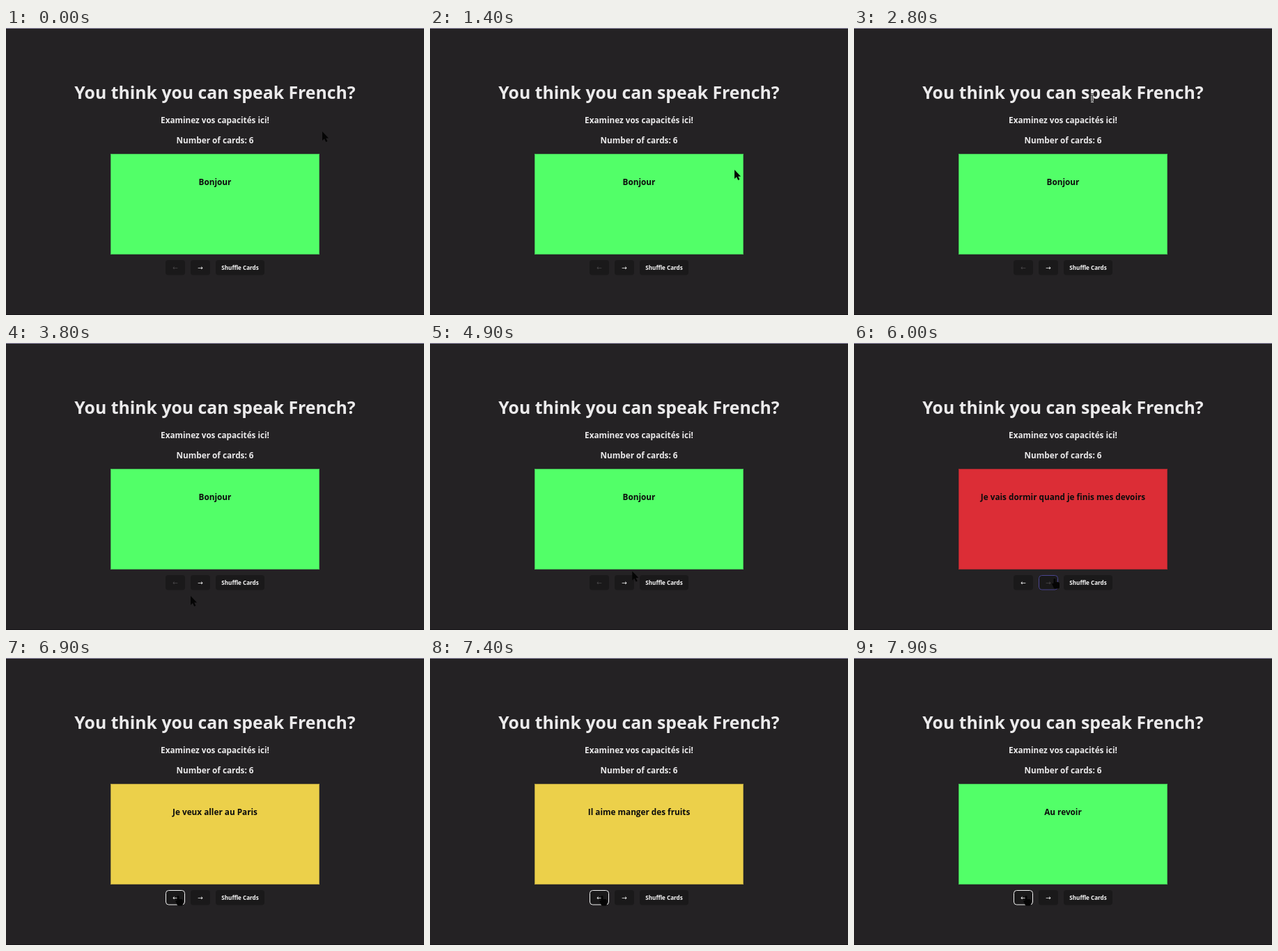
Recreate the animation shown at these times as an HTML page with a canvas. Size 600 by 413 pixels, loop 8 s.

```html
<!DOCTYPE html>
<html lang="en">
<head>
<meta charset="utf-8">
<title>Flashcards</title>
<style>
  html, body { margin: 0; width: 100%; height: 100%; overflow: hidden; background: #242224; }
  canvas { display: block; width: 600px; height: 413px; }
</style>
</head>
<body>
<canvas id="stage"></canvas>
<script>
const W = 600, H = 413, LOOP = 8000, STEP = 100;
const canvas = document.getElementById('stage');
const ctx = canvas.getContext('2d');
const ratio = window.devicePixelRatio || 1;
canvas.width = W * ratio;
canvas.height = H * ratio;
ctx.scale(ratio, ratio);

const FONT = '"Open Sans", "Noto Sans", sans-serif';
const INK = '#ebeaeb', BLACK = '#050505';
const GREEN = '#52ff68', YELLOW = '#ecd04a', RED = '#dc2d36';

const cards = [
  ['Bonjour', GREEN],
  ['Au revoir', GREEN],
  ['Il aime manger des fruits', YELLOW],
  ['Je veux aller au Paris', YELLOW],
  ['Nous avons fini nos devoirs', RED],
  ['Je vais dormir quand je finis mes devoirs', RED]
];
const LAST = cards.length - 1;

// key points of the pointer: time, x, y
const path = [
  [0, 454, 149], [300, 480, 215], [500, 400, 328], [900, 280, 108],
  [1300, 430, 208], [1800, 498, 170], [2500, 303, 140], [2800, 342, 101],
  [3300, 208, 241], [3700, 208, 241], [3800, 265, 364], [4300, 310, 220],
  [4500, 310, 220], [5000, 288, 341], [6200, 288, 340], [6600, 247, 343],
  [LOOP, 247, 343]
];

const buttons = [
  { id: 'prev', label: '←', x: 229, w: 28 },
  { id: 'next', label: '→', x: 265, w: 28 },
  { id: 'shuffle', label: 'Shuffle Cards', x: 301, w: 70 }
];
const BTN_Y = 334, BTN_H = 21.5;

const clamp = (v, lo, hi) => Math.min(hi, Math.max(lo, v));
const inside = (p, x, y, w, h) => p.x >= x && p.x < x + w && p.y >= y && p.y < y + h;

function pointerAt(t) {
  const i = Math.max(1, path.findIndex(p => p[0] >= t));
  const [t0, x0, y0] = path[i - 1], [t1, x1, y1] = path[i];
  const u = (t - t0) / (t1 - t0), k = u * u * (3 - 2 * u);
  return { x: x0 + (x1 - x0) * k, y: y0 + (y1 - y0) * k };
}

// one click forward, a quick run to the last card, then a slower run back
function deckAt(t) {
  const ahead = t < 5000 ? 0 : clamp(1 + Math.floor((t - 5200) / 200), 1, LAST);
  const back = clamp(Math.floor((t - 6200) / 350), 0, LAST - 1);
  const focus = back ? 'prev' : ahead && ahead < LAST ? 'next' : '';
  return { index: ahead - back, focus };
}

function text(str, y, size, color, weight = 700, x = W / 2, family = FONT) {
  ctx.font = `${weight} ${size}px ${family}`;
  ctx.textAlign = 'center';
  ctx.fillStyle = color;
  ctx.fillText(str, x, y);
}

function fillBox(color, x, y, w, h, r = 0) {
  ctx.beginPath();
  ctx.roundRect(x, y, w, h, r);
  ctx.fillStyle = color;
  ctx.fill();
}

function strokeBox(color, x, y, w, h, r = 0) {
  ctx.beginPath();
  ctx.roundRect(x + 0.5, y + 0.5, w - 1, h - 1, r);
  ctx.strokeStyle = color;
  ctx.lineWidth = 1;
  ctx.stroke();
}

function polygon(points) {
  ctx.beginPath();
  points.forEach(([x, y]) => ctx.lineTo(x, y));
  ctx.fillStyle = BLACK;
  ctx.fill();
}

function drawButton(b, disabled, focused, hovered) {
  fillBox('#1a191a', b.x, BTN_Y, b.w, BTN_H, 4);
  if (focused || hovered) {
    strokeBox(focused ? '#f2f2f2' : '#4b4690', b.x, BTN_Y, b.w, BTN_H, 4);
  }
  const mid = b.x + b.w / 2;
  const color = disabled ? '#4b494b' : '#f8f8f8';
  if (b.id === 'shuffle') text(b.label, 348.4, 8.1, color, 600, mid, '"Noto Sans", sans-serif');
  else text(b.label, 348, 9.2, color, 400, mid, '"DejaVu Sans", sans-serif');
}

function drawArrow() {
  polygon([[0, 0], [0, 13], [3, 10.3], [5.2, 15], [7.4, 14], [5.2, 9.6], [9, 9.4]]);
}

function drawBeam() {
  for (const [color, width] of [['#0a0a0a', 2.4], ['#d8d8d8', 0.9]]) {
    ctx.strokeStyle = color;
    ctx.lineWidth = width;
    ctx.beginPath();
    ctx.moveTo(-2, -5.5); ctx.lineTo(2, -5.5);
    ctx.moveTo(0, -5.5); ctx.lineTo(0, 5.5);
    ctx.moveTo(-2, 5.5); ctx.lineTo(2, 5.5);
    ctx.stroke();
  }
}

function drawHand() {
  fillBox(BLACK, -1.5, -1, 3, 10, 1.5);
  fillBox(BLACK, -1.5, 4, 8.5, 9.5, 2.5);
  polygon([[-4, 6.5], [-2.5, 5.8], [0, 8], [1, 13], [-1, 12.5]]);
}

function draw(t) {
  const { index, focus } = deckAt(t);
  const [phrase, color] = cards[index];
  const p = pointerAt(t);

  fillBox('#242224', 0, 0, W, H);
  fillBox('#8e8aa6', 0, 0, W, 1);
  fillBox('#171518', 0, H - 1, W, 1);

  text('You think you can speak French?', 102.4, 24.8, INK);
  text('Examinez vos capacités ici!', 137.4, 11.7, INK);
  text('Number of cards: 6', 166.4, 11.75, INK);

  fillBox(color, 150, 181, 300, 145);
  strokeBox('rgba(36, 34, 36, 0.3)', 150, 181, 300, 145);
  text(phrase, 226.4, 11.75, '#0c0c0c');

  let shape = inside(p, 98, 78, 404, 28) ? drawBeam : drawArrow;
  for (const b of buttons) {
    const hovered = inside(p, b.x, BTN_Y, b.w, BTN_H);
    const disabled = b.id === 'prev' && index === 0 || b.id === 'next' && index === LAST;
    if (hovered) shape = drawHand;
    drawButton(b, disabled, focus === b.id, hovered);
  }

  ctx.save();
  ctx.translate(p.x, p.y);
  shape();
  ctx.restore();
}

const start = performance.now();
function tick(now) {
  const t = Math.max(0, now - start) % LOOP;
  draw(Math.floor(t / STEP) * STEP);
  requestAnimationFrame(tick);
}
draw(0);
requestAnimationFrame(tick);
</script>
</body>
</html>
```
